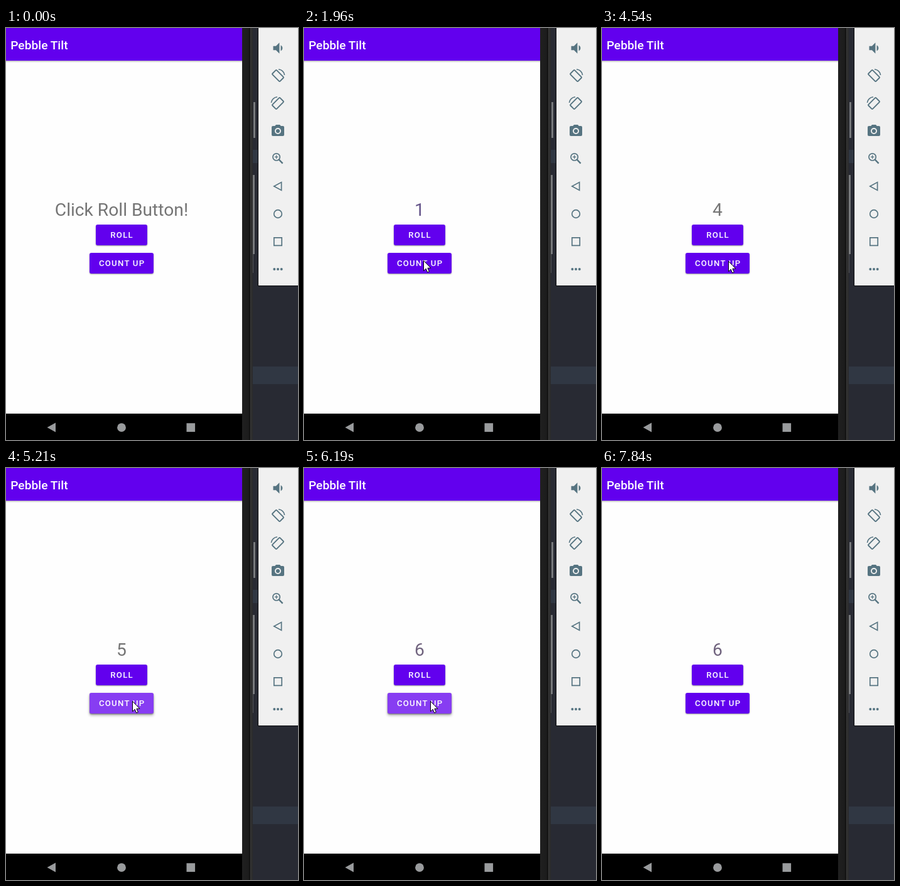
An HTML page that plays this animation: 465 px wide and 656 px high, repeating every 8.5 s.

```html
<!DOCTYPE html>
<html lang="en">
<head>
<meta charset="utf-8">
<title>Pebble Tilt</title>
<style>
  html, body { margin: 0; width: 100%; height: 100%; overflow: hidden; background: #282a33; }
  body { position: relative; font-family: Roboto, sans-serif; }
  svg { position: absolute; left: 0; top: 0; display: block; }

  .readout {
    position: absolute; left: 0; top: 272px; width: 368px; height: 36px;
    overflow: hidden; text-align: center; font-size: 28.2px; line-height: 36px; color: #757575;
  }
  .readout div { animation: count 8.5s step-end infinite; }
  .readout span { display: block; white-space: nowrap; }
  .one { color: #65558a; }
  .six { color: #70637e; }

  .button {
    position: absolute; height: 33px; border-radius: 3px; background: #6200ee;
    box-shadow: 0 1px 2px rgba(0, 0, 0, .4);
  }
  .button b {
    position: absolute; inset: 0; text-align: center; text-indent: 1.25px; white-space: nowrap;
    font-size: 13.2px; font-weight: 500; line-height: 34px; letter-spacing: 1.25px; color: #fff;
  }
  .roll { left: 143px; top: 313px; width: 82px; }
  .up { left: 133px; top: 358px; width: 102px; }

  /* --p is the moment of the press in ms, --x and --y its place */
  .press, .press::before, .touch {
    position: absolute;
    animation: 8.5s step-end calc(var(--p) * 1ms - 8500ms) infinite;
  }
  .press { inset: 0; border-radius: 3px; overflow: hidden; animation-name: lift; }
  .press::before {
    content: ""; left: calc(var(--x) - 110px); top: calc(var(--y) - 110px);
    width: 220px; height: 220px; border-radius: 50%; background: #fff; animation-name: ripple;
  }
  .touch {
    left: calc(var(--x) - 12px); top: calc(var(--y) - 12px); width: 24px; height: 24px;
    border-radius: 50%; background: rgba(240, 220, 20, .5); animation-name: touch;
  }
  .cursor { animation: move 8.5s linear infinite; }

  @keyframes count {
    0% { transform: none; }
    19.76% { transform: translateY(-36px); }
    42% { transform: translateY(-72px); }
    60.47% { transform: translateY(-108px); }
    65.41% { transform: translateY(-144px); }
    100% { transform: none; }
  }
  @keyframes lift {
    0% { box-shadow: none; }
    .82% { box-shadow: 0 2px 3px rgba(0, 0, 0, .3); }
    1.64% { box-shadow: 0 3px 4px rgba(0, 0, 0, .3); }
    3.29% { box-shadow: 0 1px 2px rgba(0, 0, 0, .2); }
    4.94%, 100% { box-shadow: none; }
  }
  @keyframes ripple {
    0% { opacity: 0; transform: scale(.3); }
    .82% { opacity: .24; transform: scale(.45); }
    1.64% { opacity: .24; transform: scale(.7); }
    2.47% { opacity: .24; transform: none; }
    4.11% { opacity: .15; transform: none; }
    4.94%, 100% { opacity: 0; transform: none; }
  }
  @keyframes touch {
    0% { opacity: 1; }
    1.64%, 100% { opacity: 0; }
  }
  @keyframes move {
    0% { transform: translate(480px, 700px); animation-timing-function: step-end; }
    1.058% { transform: translate(419px, 645px); animation-timing-function: steps(6); }
    6% { transform: translate(300px, 475px); animation-timing-function: steps(6); }
    10.94% { transform: translate(226px, 385px); animation-timing-function: steps(4); }
    14.23% { transform: translate(190px, 370px); }
    30% { transform: translate(190px, 370px); animation-timing-function: steps(5); }
    34.11% { transform: translate(194px, 327px); }
    46.82% { transform: translate(194px, 327px); animation-timing-function: steps(8); }
    53.41% { transform: translate(201px, 371px); }
    84% { transform: translate(201px, 371px); animation-timing-function: steps(10); }
    92.23%, 100% { transform: translate(480px, 700px); }
    92.22% { transform: translate(452px, 672px); animation-timing-function: step-end; }
  }
</style>
</head>
<body>
<svg width="465" height="656" viewBox="0 0 465 656">
  <defs>
    <linearGradient id="shade" x2="0" y2="1">
      <stop stop-color="#000" stop-opacity=".28"/>
      <stop offset="1" stop-color="#000" stop-opacity="0"/>
    </linearGradient>
    <linearGradient id="bezel">
      <stop stop-color="#202020"/>
      <stop offset=".62" stop-color="#1c1c1c"/>
      <stop offset=".7" stop-color="#080808"/>
      <stop offset=".78" stop-color="#343434"/>
      <stop offset="1" stop-color="#2a2a2b"/>
    </linearGradient>
    <g id="turn" fill="none" stroke-width="1.9">
      <rect x="-4.8" y="-8.6" width="9.6" height="17.2" rx="1.2" transform="rotate(-45)"/>
      <path d="M1-10.2A10.5 10.5 0 0 1 10.6-1" stroke-width="1.6"/>
    </g>
  </defs>

  <!-- editor behind -->
  <rect width="465" height="656" fill="#282a33"/>
  <path d="M393 539h72v28h-72zM393 194h9v21h-9z" fill="#303743"/>
  <path d="M394 118h3v57h-3zM393 234h3v126h-3z" fill="#77797c"/>
  <path d="M393 360h1v30h-1z" fill="#55575c"/>

  <!-- phone -->
  <rect x="376" width="17" height="656" fill="url(#bezel)"/>
  <rect width="376" height="656" fill="#fefefe"/>
  <rect y="52" width="376" height="3" fill="url(#shade)"/>
  <rect width="376" height="52" fill="#6200ee"/>
  <text x="7.2" y="33.7" font-size="19.2" font-weight="500" fill="#fff">Pebble Tilt</text>
  <rect y="614" width="376" height="42"/>
  <g fill="#999b9d">
    <path d="M65.5 636 79 628.5v15zM287.5 629.3h13.6v13.6h-13.6z"/>
    <circle cx="184" cy="636.2" r="6.9"/>
  </g>

  <!-- tool panel -->
  <rect x="401" width="64" height="411" fill="#08090b"/>
  <rect x="402" width="63" height="410" fill="#f0f0f0"/>
  <g fill="#567481">
    <path transform="translate(420 18.8) scale(1.1)" d="M18.5 12c0-1.77-1-3.3-2.5-4v8c1.5-.7 2.5-2.2 2.5-4zM5 9v6h4l5 5V4L9 9z"/>
    <path transform="translate(421 152)" fill-rule="evenodd" d="M9 2 7.2 4H4a2 2 0 0 0-2 2v12a2 2 0 0 0 2 2h16a2 2 0 0 0 2-2V6a2 2 0 0 0-2-2h-3.2L15 2zM12 7a5 5 0 1 1 0 10 5 5 0 0 1 0-10z"/>
    <circle cx="433" cy="164" r="3.1"/>
    <circle cx="427.3" cy="384" r="2"/>
    <circle cx="433" cy="384" r="2"/>
    <circle cx="438.7" cy="384" r="2"/>
  </g>
  <g stroke="#567481" fill="none" stroke-width="1.7">
    <use href="#turn" x="433" y="76"/>
    <use href="#turn" transform="translate(433 120) scale(-1 1)"/>
    <circle cx="430.6" cy="205.4" r="5.6"/>
    <path d="M434.8 209.6 440.6 215.6" stroke-width="2.3"/>
    <path d="M430.6 202.6v5.6M427.8 205.4h5.6" stroke-width="1.3"/>
    <path d="M426.8 252 438.6 245.6v12.8zM426.8 333.9h12.4v12.4h-12.4z"/>
    <circle cx="433" cy="296" r="6.3"/>
  </g>
</svg>

<div class="readout"><div>
  <span>Click Roll Button!</span>
  <span class="one">1</span>
  <span>4</span>
  <span>5</span>
  <span class="six">6</span>
</div></div>

<div class="button roll">
  <i class="press" style="--p:3430;--x:51px;--y:14px"></i>
  <b>ROLL</b>
</div>
<div class="button up">
  <i class="press" style="--p:1540;--x:57px;--y:12px"></i>
  <i class="press" style="--p:5000;--x:68px;--y:13px"></i>
  <i class="press" style="--p:5420;--x:68px;--y:13px"></i>
  <i class="press" style="--p:5920;--x:68px;--y:13px"></i>
  <i class="press" style="--p:6320;--x:68px;--y:13px"></i>
  <b>COUNT UP</b>
</div>

<svg width="465" height="656" viewBox="0 0 465 656">
  <path class="cursor" d="M.5.5v16.2l3.7-3.5 2.4 5.7 2.7-1.1-2.4-5.6h5z" fill="#fff" stroke="#000" stroke-width="1"/>
</svg>

<i class="touch" style="--p:1540;--x:190px;--y:370px"></i>
<i class="touch" style="--p:3430;--x:194px;--y:327px"></i>
<i class="touch" style="--p:5000;--x:201px;--y:371px"></i>
<i class="touch" style="--p:5420;--x:201px;--y:371px"></i>
<i class="touch" style="--p:5920;--x:201px;--y:371px"></i>
<i class="touch" style="--p:6320;--x:201px;--y:371px"></i>
</body>
</html>
```
